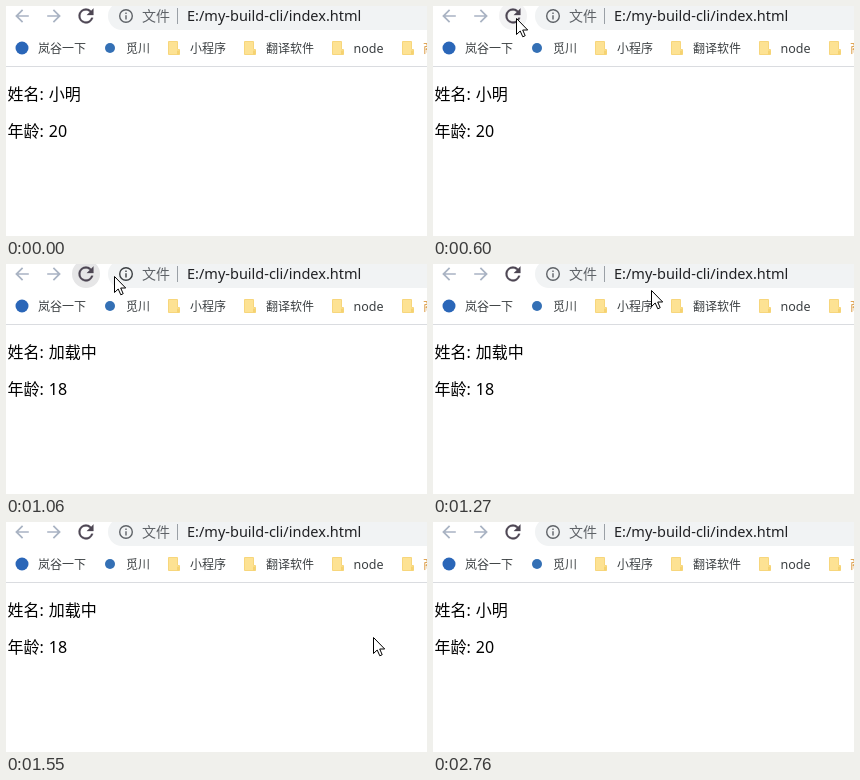
An HTML page for the animation above (3620 ms loop, 421 px wide and 230 px high).

```html
<!DOCTYPE html>
<html lang="zh-CN">
<head>
<meta charset="utf-8">
<style>
html, body { margin: 0; width: 100%; height: 100%; overflow: hidden; background: #fff; }
svg { display: block; width: 421px; height: 230px; font-family: "Noto Sans", "Noto Sans CJK SC", "Noto Sans CJK", sans-serif; }
text { white-space: pre; }
.marks { font-size: 12px; fill: #3c4043; }
.page { font-size: 16px; fill: #000; word-spacing: .8px; }
</style>
</head>
<body>
<svg viewBox="0 0 421 230">
  <defs>
    <path id="arrow" d="M8-1H-4.17L1.42-6.59 0-8-8 0 0 8 1.41 6.59-4.17 1H8z" transform="scale(.85)"/>
    <g id="folder">
      <path d="M.5 .5H9.5V8.5H11.5V13.5H.5z" fill="#fde293" stroke="#f7d67c"/>
      <path d="M9 13.5V9.5H11.5V13.5z" fill="#f5d271"/>
    </g>
  </defs>

  <use href="#arrow" x="16" y="10" fill="#a9b3c3"/>
  <use href="#arrow" transform="translate(48 10) scale(-1 1)" fill="#a9b3c3"/>
  <circle id="halo" cx="80" cy="10" r="14"/>
  <path transform="translate(68.8 -1.2) scale(.93)" fill="#4d4653" stroke="#4d4653" stroke-width=".3" d="M17.65 6.35A7.95 7.95 0 0 0 12 4a8 8 0 1 0 7.73 10h-2.08A6 6 0 1 1 12 6c1.66 0 3.14.69 4.22 1.78L13 11h7V4z"/>

  <rect x="102" y="-4" width="360" height="28" rx="14" fill="#f1f3f4"/>
  <path id="info" transform="translate(111.6 1.6) scale(.7)" d="M11 7h2v2h-2zm0 4h2v6h-2zm1-9a10 10 0 1 0 0 20 10 10 0 0 0 0-20zm0 18a8 8 0 1 1 0-16 8 8 0 0 1 0 16z"/>
  <text x="136" y="15" font-size="14" fill="#5f6368">文件</text>
  <path d="M171.5 2V18" stroke="#9aa0a6"/>
  <text x="181" y="15" font-size="14.5" fill="#202124">E:/my-build-cli/index.html</text>

  <circle cx="16" cy="42" r="6.5" fill="#2a66b8"/>
  <circle cx="104" cy="42" r="5" fill="#3470b5"/>
  <use href="#folder" x="162" y="35"/>
  <use href="#folder" x="238" y="35"/>
  <use href="#folder" x="326" y="35"/>
  <use href="#folder" x="396" y="35"/>
  <g class="marks">
    <text x="32" y="47">岚谷一下</text>
    <text x="120" y="47">觅川</text>
    <text x="184" y="47">小程序</text>
    <text x="260" y="47">翻译软件</text>
    <text x="347.5" y="47" font-size="12.5">node</text>
    <text x="417" y="47" fill="#d58a24">商</text>
  </g>
  <path d="M0 60.5H421" stroke="#dadce0"/>

  <g class="page">
    <text id="name" x="1.5" y="94"></text>
    <text id="age" x="1.5" y="131"></text>
  </g>
  <path id="cursor" d="M.5 .5V16.5L4.2 13 6.8 18.8 9.2 17.7 6.7 12H11.7z" fill="#fff" stroke="#000"/>
</svg>
<script>
const LOOP = 3620, SHOW = 70, HIDE = 1770, RELOAD = 800, LOADED = 2760;

// Pointer path: time, x, y
const path = [
  [70, 345, 194], [140, 245, 126], [200, 158, 66], [270, 106, 29],
  [400, 91, 17], [530, 83, 12], [870, 83, 12], [1060, 108, 12],
  [1200, 165, 18], [1340, 270, 34], [1410, 317, 48],
  [1480, 345, 76], [1620, 388, 154], [1690, 409, 193]
];
const $ = id => document.getElementById(id);
const [halo, info, name, age, cursor] = ["halo", "info", "name", "age", "cursor"].map($);

// The pointer is sampled at about 15 frames per second
function sampleTime(t) {
  if (t >= 1060) return 1060 + Math.floor((t - 1060) / 70) * 70;
  return Math.round(Math.floor((t + 4) / (200 / 3)) * 20 / 3) * 10;
}

function pointAt(t) {
  let i = 1;
  while (i < path.length - 1 && t > path[i][0]) i++;
  const [t0, x0, y0] = path[i - 1], [t1, x1, y1] = path[i];
  const k = Math.min(1, Math.max(0, (t - t0) / (t1 - t0)));
  return [x0 + (x1 - x0) * k, y0 + (y1 - y0) * k].map(Math.round);
}

function draw(now) {
  const t = now % LOOP;
  const loading = t >= RELOAD && t < LOADED;
  name.textContent = "姓名: " + (loading ? "加载中" : "小明");
  age.textContent = "年龄: " + (loading ? 18 : 20);

  halo.setAttribute("fill", t < 530 || t >= 1130 ? "none" : t < 730 ? "#f3f3f4" : "#e6e6e7");
  info.setAttribute("fill", t >= 1000 && t < 1130 ? "#3c4043" : "#5f6368");

  cursor.setAttribute("visibility", t >= SHOW && t < HIDE ? "visible" : "hidden");
  cursor.setAttribute("transform", `translate(${pointAt(sampleTime(t))})`);
}

const start = performance.now();
function tick() {
  draw(performance.now() - start);
  requestAnimationFrame(tick);
}
tick();
</script>
</body>
</html>
```
